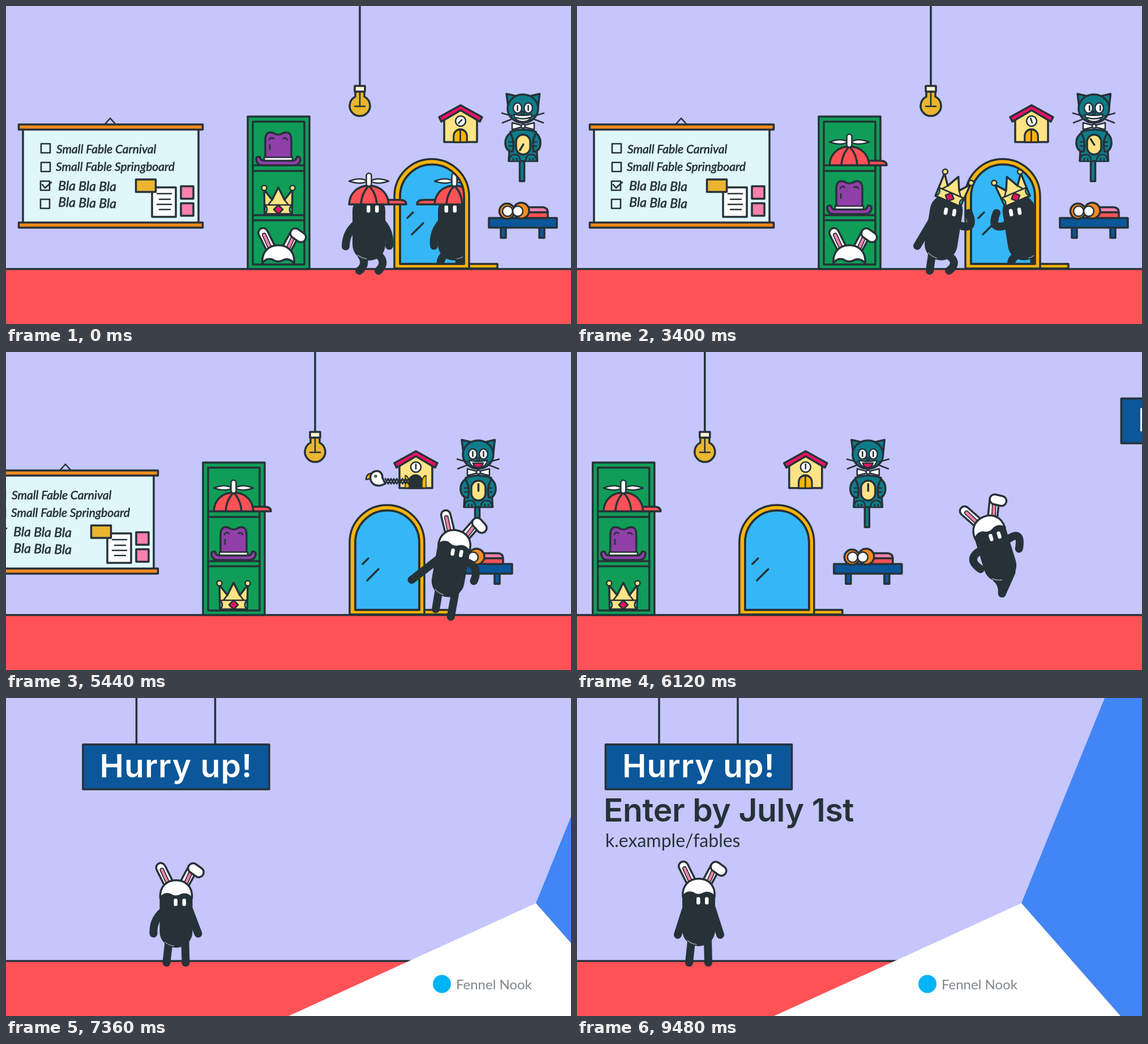
An HTML page that plays this animation: 998x561 px, repeating every 9600 ms.

```html
<!DOCTYPE html>
<html lang="en">
<head>
<meta charset="utf-8">
<title>Hat rack</title>
<style>
  html, body { margin: 0; width: 100%; height: 100%; overflow: hidden; background: #c5c6fc; }
  svg { display: block; width: 998px; height: 561px; }
  .ink { stroke: #263238; stroke-width: 3.5; stroke-linejoin: round; stroke-linecap: round; }
  .thin { stroke-width: 2.6; }
  .no { fill: none; }
  .w { fill: #fff; } .green { fill: #0f9d58; } .gold { fill: #fbb309; } .cream { fill: #ffe384; }
  .red { fill: #ff5256; } .pink { fill: #ff80ab; } .rose { fill: #e91363; } .blue { fill: #0b5799; }
  .teal { fill: #0f7c8a; } .orange { fill: #ff8a1e; } .plum { fill: #903fa8; } .mustard { fill: #ebb62f; }
  .dark { fill: #263238; }
  .limb { fill: none; stroke: #263238; stroke-width: 14; stroke-linecap: round; stroke-linejoin: round; }
  text { stroke: none; }
  .note { font: italic 500 21px Lato, sans-serif; fill: #263238; stroke: #263238; stroke-width: .5; }
  .note.big { font-size: 23px; }
  .head { font: 600 57px Inter, sans-serif; }
</style>
</head>
<body>
<svg viewBox="0 0 998 561" xmlns="http://www.w3.org/2000/svg">
  <defs>
    <g id="h0" class="ink">
      <path class="red" d="M33 0V-8H54Q66 -8 66 0Z"/>
      <path class="red" d="M-35 0C-34 -20 -20 -33 0 -33S34 -20 35 0Z"/>
      <path class="no" d="M0 -33Q-13 -20 -14 0M0 -33Q13 -20 14 0"/>
      <path class="w thin" d="M-3 -41Q-14 -49 -35 -41Q-14 -34 -3 -41M3 -41Q14 -49 35 -41Q14 -34 3 -41"/>
      <rect class="w thin" x="-4.5" y="-55" width="9" height="23" rx="4.5"/>
    </g>
    <g id="h1" class="ink">
      <path class="plum" d="M-23 -13V-44Q-23 -58 -14 -58Q-9 -58 -5 -55Q0 -53 5 -55Q9 -58 14 -58Q23 -58 23 -44V-13Z"/>
      <path class="no thin" d="M-16 -45q3 -6 8 -2M8 -47q5 -3 8 2M-15 -36v8"/>
      <rect class="w thin" x="-25" y="-14" width="50" height="7"/>
      <path class="plum" d="M-25 -8H25Q31 -8 33 -15Q40 -16 39 -9Q37 0 28 0H-28Q-37 0 -39 -9Q-40 -16 -33 -15Q-31 -8 -25 -8Z"/>
    </g>
    <g id="h2" class="ink">
      <path class="cream" d="M-24 0L-25 -43L-11 -25L0 -47L11 -25L25 -43L24 0Z"/>
      <path class="no thin" d="M-24 -16H24M-11 -25L-18 -16M11 -25L18 -16"/>
      <path class="thin" fill="#1de9b6" d="M-24 -15a8 8 0 0 1 0 14ZM24 -15a8 8 0 0 0 0 14Z"/>
      <path class="rose thin" d="M0 -16L8 -8L0 0L-8 -8Z"/>
      <circle class="cream thin" cx="-25" cy="-46" r="4.5"/>
      <circle class="cream thin" cx="25" cy="-46" r="4.5"/>
    </g>
    <g id="h3" class="ink">
      <g class="no">
        <path stroke-width="20" d="M-12 -24L-27 -54M14 -24L29 -52"/>
        <path stroke="#fff" stroke-width="13" d="M-12 -24L-27 -54M14 -24L29 -52"/>
        <path stroke-width="8" d="M-14 -26L-25 -50M17 -26L26 -46"/>
        <path stroke="#ff80ab" stroke-width="4.5" d="M-14 -26L-25 -50M17 -26L26 -46"/>
        <path stroke-width="21" d="M30 -53L40 -46"/>
        <path stroke="#fff" stroke-width="14" d="M30 -53L40 -46"/>
      </g>
      <path class="w" d="M-28 0C-30 -22 -15 -32 0 -32S30 -22 28 0Q20 -10 9 -6Q-1 0 -11 -7Q-22 -10 -28 0Z"/>
    </g>
    <clipPath id="glass"><path d="M696 455V336A56.5 56.5 0 0 1 809 336V455Z"/></clipPath>
    <clipPath id="out"><path d="M600 150H803V300H600Z"/></clipPath>
  </defs>

  <rect width="998" height="561" fill="#c5c6fc"/>
  <rect class="red" y="464" width="998" height="97"/>
  <path class="ink" d="M-5 464H1003"/>

  <g id="world" class="ink">
    <g id="board">
      <path class="no thin" d="M174 209L184 198L194 209"/>
      <rect x="30" y="214" width="310" height="172" fill="#dff7fa"/>
      <rect class="orange" x="22.500" y="209" width="325" height="9"/>
      <rect class="orange" x="22.500" y="382" width="325" height="9"/>
      <path class="no thin" d="M62 243h16v16h-16zM62 276h16v16h-16zM61 309h16v16h-16zM61 341h16v16h-16zM64 315L69 321L80 311"/>
      <rect class="w" x="258" y="320" width="42" height="52"/>
      <path class="no thin" d="M267 331H292M271 341H290M267 350H292M271 359H290"/>
      <rect class="mustard" x="229.500" y="306" width="35" height="22"/>
      <path class="pink" d="M309 318h22v22h-22zM309 348h22v22h-22z"/>
      <text class="note" x="89" y="260">Small Fable Carnival</text>
      <text class="note" x="88" y="291">Small Fable Springboard</text>
      <text class="note big" x="92" y="325" transform="rotate(1 92 325)">Bla Bla Bla</text>
      <text class="note big" x="92" y="354" transform="rotate(1.500 92 354)">Bla Bla Bla</text>
    </g>

    <g id="rack">
      <rect class="green" x="427" y="195" width="109" height="269"/>
      <rect class="green" x="436" y="204" width="91" height="252"/>
      <path class="no" d="M436 281H527M436 291H527M436 369H527M436 378H527"/>
      <g id="slots"></g>
    </g>

    <g id="bulb">
      <path d="M625 -5V141"/>
      <path class="mustard" d="M617 151V160A18 18 0 1 0 633 160V151Z"/>
      <rect x="616" y="141" width="18" height="10" fill="#fff3d6"/>
      <path class="no thin" d="M625 151V177M616 177H634"/>
    </g>

    <g id="house">
      <path class="cream" d="M774 240V198L803 180L832 198V240Z"/>
      <path class="rose" d="M803 175L841 196L837 204L803 184L769 204L765 196Z"/>
      <circle class="w thin" cx="803" cy="203" r="9"/>
      <path id="hand1" class="thin" d="M803 206V198"/>
      <path class="dark" d="M791 240V229A11.500 11.500 0 0 1 814 229V240Z"/>
      <path id="doorL" class="gold thin" d="M791 240V229Q792 219 802.500 218V240Z"/>
      <path id="doorR" class="gold thin" d="M814 240V229Q813 219 802.500 218V240Z"/>
      <g clip-path="url(#out)"><g id="cuckoo">
        <path id="lattice" class="no thin"/>
        <g id="bird">
          <path class="gold thin" d="M-9 -9Q-18 -8 -18 2L-8 0Z"/>
          <path class="w" d="M16 9Q4 16 -5 10Q-12 4 -10 -5Q-7 -14 3 -13Q11 -11 11 -1Z"/>
          <circle class="dark" cx="-1" cy="-4" r=".8"/>
        </g>
      </g></g>
    </g>

    <g id="cat">
      <rect class="teal" x="907.500" y="255" width="8" height="54"/>
      <path class="teal" d="M891 222Q913 214 936 222L938.500 273.500H888Z"/>
      <path class="teal" d="M891 224Q881 231 882 244Q884 257 895 257Q898 246 895 234ZM936 224Q945 231 944 244Q942 257 932 257Q929 246 932 234Z"/>
      <path class="no thin" d="M889 240h5M889 247h5M937 240h-5M937 247h-5"/>
      <path class="teal thin" d="M889 273q0 -11 10 -11q9 0 9 11M918 273q0 -11 10 -11q9 0 9 11"/>
      <path class="no thin" d="M896 273v-4M902 273v-4M925 273v-4M931 273v-4"/>
      <rect class="cream" x="901" y="227" width="25" height="35" rx="12.500"/>
      <path id="hand2" d="M913.500 245V233"/>
      <path class="teal" d="M884 155L906 160L887 178ZM942.500 155L921 160L940 178Z"/>
      <ellipse class="teal" cx="913" cy="181" rx="27" ry="25"/>
      <path class="no thin" d="M876 189L894 194M877 206L895 199M950 189L932 194M949 206L931 199"/>
      <path class="w thin" d="M897 191Q913 195 929 191Q927 204 913 204Q899 204 897 191Z"/>
      <path id="grin" class="no thin" d="M901 197Q913 201 925 197"/>
      <path id="mouth" class="rose thin" d="M904 196H922Q920 204 913 204Q906 204 904 196Z"/>
      <ellipse class="w thin" cx="903.500" cy="180" rx="7.500" ry="9"/>
      <ellipse class="w thin" cx="922.500" cy="180" rx="7.500" ry="9"/>
      <path id="pupils" class="thin" d="M903.500 176v8M922.500 176v8"/>
      <circle class="teal thin" cx="913" cy="189" r="2.500"/>
      <path class="w thin" d="M894 206L913 211L933 206V218L913 213L894 218Z"/>
      <circle class="w thin" cx="913.500" cy="212" r="3.500"/>
    </g>

    <g id="table">
      <path class="blue" d="M874 391h9v18h-9zM942 391h9v18h-9zM853 374H973V391H853Z"/>
      <path class="pink" d="M915 364V355H948Q957 356 957 364Z"/>
      <rect class="red" x="915" y="364" width="42" height="10"/>
      <circle class="orange" cx="910" cy="361" r="14"/>
      <circle class="orange" cx="885" cy="362" r="13.500"/>
      <circle class="w thin" cx="886" cy="362" r="9"/>
      <circle class="w thin" cx="904" cy="362" r="9"/>
    </g>

    <g id="mirror">
      <rect class="gold" x="810" y="455" width="58" height="8"/>
      <path class="gold" d="M686 463V336A66 66 0 0 1 818 336V463Z"/>
      <path fill="#35b6f7" d="M696 455V336A56.500 56.500 0 0 1 809 336V455Z"/>
      <g clip-path="url(#glass)"><use href="#guy" transform="translate(1433 0) scale(-1 1)"/></g>
      <path class="no" d="M696 455V336A56.500 56.500 0 0 1 809 336V455Z"/>
      <path d="M709 374L719 364M717 403L737 383"/>
    </g>

    <g id="sign">
      <path d="M1455 -5V82M1594 -5V82"/>
      <rect class="blue" x="1360.500" y="82" width="329" height="79"/>
      <text class="head w" x="1525" y="140" text-anchor="middle" letter-spacing="1">Hurry up!</text>
    </g>

    <g id="guy">
      <path id="legL" class="limb"/>
      <path id="legR" class="limb"/>
      <g id="torso">
        <rect class="dark" x="-29" y="333" width="58" height="116" rx="28" stroke="none"/>
        <path class="no" stroke="#aab3b8" stroke-width="1.200" d="M-20 439Q-13 445 -4 446"/>
        <g id="eyes" class="w" stroke="none">
          <rect x="-4" y="-6.500" width="6.500" height="13" rx="3"/>
          <rect x="11" y="-6.500" width="6.500" height="13" rx="3"/>
        </g>
        <use id="worn"/>
      </g>
      <path id="armL" class="limb"/>
      <path id="armR" class="limb"/>
    </g>
  </g>

  <text id="line1" class="head dark" x="47" y="218" letter-spacing="-.4">Enter by July 1st</text>
  <text id="line2" class="dark" x="50" y="263" style="font:400 32px Lato,sans-serif">k.example/fables</text>

  <g id="panel">
    <path fill="#4285f4" d="M0 362L147 0H3500V561H175Z"/>
    <path class="w" d="M0 362L-437 561H175Z"/>
    <circle cx="-166" cy="504.500" r="16" fill="#00b4f5"/>
    <text x="-141" y="514" fill="#80868b" style="font:400 24px Lato,sans-serif">Fennel Nook</text>
  </g>
</svg>
<script>
const LOOP = 9600, STEP = 40, HOLD = 9480, SWAP = 1200, HIP = 440;
const $ = id => document.getElementById(id);
const set = (id, name, value) => $(id).setAttribute(name, value);
const clamp = (v, lo = 0, hi = 1) => Math.min(hi, Math.max(lo, v));
const mix = (a, b, k) => a + (b - a) * k;
const span = (t, from, to) => clamp((t - from) / (to - from));
const smooth = k => k * k * (3 - 2 * k);
const cubic = k => k < .5 ? 4 * k ** 3 : 1 - 4 * (1 - k) ** 3;
const show = (id, on) => set(id, 'display', on ? 'inline' : 'none');

// time, x, lift, lean, left hand x y, right hand x y, legs (0 stand, 1 run, 2 tuck)
const poses = [
  [0, 641, 0, 0, -41, 424, 36, 423, 0],
  [1100, 641, 0, 0, -41, 424, 36, 423, 0],
  [1500, 641, 1, 0, -49, 413, 44, 413, 0],
  [2300, 641, 0, 0, -41, 424, 36, 423, 0],
  [2900, 640, 0, 9, -39, 424, 52, 366, 0],
  [3450, 640, 0, 9, -39, 424, 52, 366, 0],
  [3700, 641, 2, 0, -41, 424, 38, 423, 0],
  [4700, 641, 1, -4, -41, 422, 38, 422, 0],
  [5000, 672, 12, 8, -50, 421, 45, 415, 1],
  [5440, 856.5, 14, 10, -61, 419, 49, 421, 1],
  [5750, 991, 14, 0, -45, 425, 40, 410, 1],
  [6120, 1152, 45, -17, -40, 428, 28, 392, 2],
  [6600, 1350, 14, 4, -48, 422, 42, 415, 1],
  [7080, 1525, 8, 0, -40, 424, 39, 424, 0],
  [9360, 1525, 11, 0, -37, 429, 38, 429, 0]
];
const hats = [
  { y: 350, eyes: 358, tilt: 0 },
  { y: 343, eyes: 354, tilt: 0 },
  { y: 344, eyes: 362, tilt: 1.6 },
  { y: 362, eyes: 369, tilt: .3 }
];
const slots = [[481, 281], [481, 367], [481, 454]];
$('slots').innerHTML = slots.map(([x, y], i) => `<use id="slot${i}" x="${x}" y="${y}"/>`).join('');

function poseAt(t) {
  const i = poses.findIndex(p => p[0] > t);
  if (i < 0) return poses[poses.length - 1];
  const a = poses[i - 1], b = poses[i], k = span(t, a[0], b[0]);
  return a.map((v, n) => mix(v, b[n], n < 2 ? k : smooth(k)));
}

function turn(x, y, deg) {
  const r = deg * Math.PI / 180, dy = y - HIP;
  return [x * Math.cos(r) - dy * Math.sin(r), HIP + x * Math.sin(r) + dy * Math.cos(r)];
}

// A limb of fixed reach whose joint bends to the given side.
function limb(id, [x1, y1], [x2, y2], reach, side) {
  const dx = x2 - x1, dy = y2 - y1, d = Math.hypot(dx, dy) || 1;
  const bend = Math.sqrt(Math.max(0, reach * reach - d * d)) / d;
  const s = side * dy < 0 ? -bend : bend;
  set(id, 'd', `M${x1} ${y1}Q${(x1 + x2) / 2 + dy * s} ${(y1 + y2) / 2 - dx * s} ${x2} ${y2}`);
}

function drawGuy(t, hat) {
  const [, x, rise, lean, lx, ly, rx, ry, legs] = poseAt(t);
  const run = clamp(legs), tuck = clamp(legs - 1);
  const phase = 2.3 + (t - 5440) / 320 * 2 * Math.PI;
  const idle = .75 * (1 - Math.cos(2 * Math.PI * t / SWAP)) * 2;
  const lift = rise + mix(idle, 4 * Math.abs(Math.sin(phase)), run) * (1 - tuck);
  const up = ([px, py]) => [px, py - lift];
  const foot = (rest, ph) => [
    mix(mix(rest, 20 * Math.cos(ph) - 5, run), -2, tuck),
    mix(mix(467, 467 - 18 * Math.max(0, Math.sin(ph)), run), 471 - lift, tuck)
  ];
  const wave = smooth(span(t, 8700, 9040)) - smooth(span(t, 9040, 9360));
  const { y, eyes, tilt } = hats[hat];

  set('guy', 'transform', `translate(${x} 0)`);
  set('torso', 'transform', `translate(0 ${-lift}) rotate(${lean} 0 ${HIP})`);
  set('eyes', 'transform', `translate(0 ${eyes})`);
  set('worn', 'href', '#h' + hat);
  set('worn', 'transform', `translate(0 ${y}) rotate(${lean * tilt})`);
  limb('legL', up(turn(-13, 440, lean)), foot(-17, phase), 30, 1);
  limb('legR', up(turn(16, 438, lean)), foot(17, phase + Math.PI), 33, 1);
  limb('armL', up(turn(-23, 385, lean)), up([mix(lx, -66, wave), mix(ly, 402, wave)]), 44, -1);
  limb('armR', up(turn(23, 382, lean)), up([rx, ry]), 44, 1);
}

function drawCuckoo(t) {
  const door = span(t, 4600, 4750) - span(t, 5900, 6020);
  const out = smooth(span(t, 4720, 5050)) - smooth(span(t, 5620, 5900));
  const leaf = hinge => `translate(${hinge} 0) scale(${mix(1, -.6, door)} 1) translate(${-hinge} 0)`;
  set('doorL', 'transform', leaf(791));
  set('doorR', 'transform', leaf(814));
  show('cuckoo', out > .02);
  const x = mix(810, 733, out), from = x + 16, gap = Math.max(0, 800 - from) / 10;
  const zig = s => 'M' + Array.from({ length: 11 }, (_, i) =>
    `${from + i * gap} ${228 + s * (i % 2 ? 4.5 : -4.5)}`).join('L');
  set('bird', 'transform', `translate(${x} 223)`);
  set('lattice', 'd', zig(1) + zig(-1));
}

function draw(t) {
  const pan = cubic(span(t, 4490, 8335));
  const hat = Math.min(3, Math.floor(t / SWAP));
  set('world', 'transform', `translate(${-1310 * pan} 0)`);
  set('panel', 'transform', `translate(${785 + 2315 * (1 - pan)} 0)`);
  slots.forEach((_, i) => set('slot' + i, 'href', '#h' + (i < hat ? i : i + 1)));

  const clock = Math.min(360, 210 + t * .0345);
  set('hand1', 'transform', `rotate(${Math.min(360, clock + 15)} 803 203)`);
  set('hand2', 'transform', `rotate(${clock} 913.5 244.5)`);
  set('pupils', 'transform', `translate(${t < 4800 ? 2.5 * Math.sin(t * Math.PI / 800) : 0} 0)`);
  show('mouth', t >= 4600);
  show('grin', t < 4600);

  drawCuckoo(t);
  drawGuy(t, hat);
  set('line1', 'opacity', span(t, 8060, 8300));
  set('line2', 'opacity', span(t, 8200, 8440));
}

const start = performance.now();
function tick() {
  const t = (performance.now() - start) % LOOP;
  draw(Math.min(HOLD, Math.floor(t / STEP) * STEP));
  requestAnimationFrame(tick);
}
tick();
</script>
</body>
</html>
```
